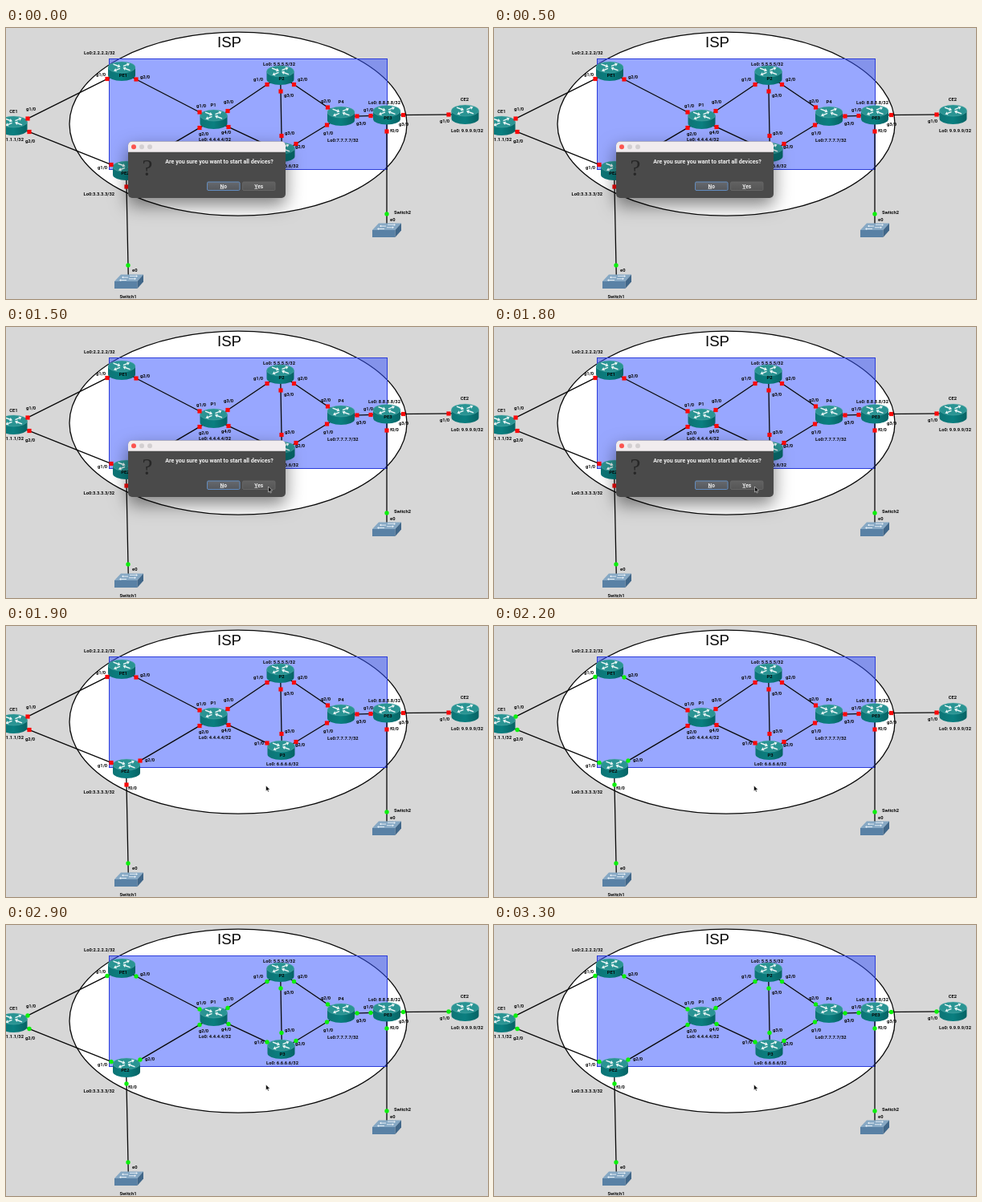
An HTML page with a canvas for the animation above (3400 ms loop, 600x338 px).

```html
<!DOCTYPE html>
<html lang="en">
<head>
<meta charset="utf-8">
<title>Starting a network topology</title>
<style>
html, body { margin: 0; width: 100%; height: 100%; overflow: hidden; background: #d7d7d7; }
canvas { display: block; width: 600px; height: 338px; }
</style>
</head>
<body>
<canvas id="stage"></canvas>
<script>
const W = 600, H = 338, LOOP = 3400, STEP = 100;
const DIALOG_END = 1900, BOOT_START = 2000, BOOT_GAP = 100;
const canvas = document.getElementById('stage');
const ctx = canvas.getContext('2d');
const scale = window.devicePixelRatio || 1;
canvas.width = W * scale;
canvas.height = H * scale;

const SANS = 'Roboto, Inter, sans-serif';
const INK = '#080808', LABEL = 5.8;

// centre and label position, in boot order
const routers = {
  CE1: { x: 9.5, y: 122, lx: 9.5, ly: 105.5 },
  PE1: { x: 144, y: 54, lx: 146, ly: 61 },
  PE2: { x: 150, y: 178, lx: 148.5, ly: 182.5 },
  P1: { x: 258.5, y: 114, lx: 258, ly: 98 },
  P2: { x: 341.5, y: 59, lx: 343, ly: 65 },
  P3: { x: 342.5, y: 155, lx: 344, ly: 163 },
  P4: { x: 417, y: 110, lx: 417, ly: 94 },
  PE3: { x: 474, y: 108.5, lx: 475.5, ly: 114 },
  CE2: { x: 571.5, y: 108, lx: 571, ly: 91 }
};
Object.values(routers).forEach((r, i) => { r.on = BOOT_START + i * BOOT_GAP; });
const switches = {
  Switch1: { x: 153, y: 316, lx: 152, ly: 336.5, on: 0 },
  Switch2: { x: 474, y: 252, lx: 493.5, ly: 232, on: 0 }
};
const nodes = { ...routers, ...switches };

// ends, with the port dot at each end
const links = [
  ['CE1', 27, 113, 'PE1', 126, 63.5],
  ['CE1', 29, 129.5, 'PE2', 131, 170.5],
  ['PE1', 162, 64, 'P1', 241, 105],
  ['PE2', 167, 168, 'P1', 241, 124.5],
  ['P1', 276, 103.5, 'P2', 325, 70.5],
  ['P1', 277, 123.5, 'P3', 325, 146],
  ['P2', 342, 79, 'P3', 343, 134.5],
  ['P2', 358.5, 70.5, 'P4', 400.5, 99],
  ['P3', 361, 144.5, 'P4', 399.5, 121],
  ['P4', 437, 110, 'PE3', 454, 109.5],
  ['PE3', 494.5, 108.5, 'CE2', 551, 108],
  ['PE3', 474, 129, 'Switch2', 474, 232],
  ['PE2', 150, 198, 'Switch1', 152, 296]
];

// port labels: left edge and baseline
const ports = {
  'g1/0': [112, 60, 237, 99, 308, 66, 309, 148, 395, 133, 445, 104, 540, 117.5, 25, 103, 114, 176],
  'g2/0': [167, 63, 240, 133.5, 363, 66, 360, 150, 392, 93, 24, 143, 173, 169],
  'g3/0': [271, 94, 346, 86, 347, 132.5, 436, 121, 489, 121.5],
  'g4/0': [268, 131.5],
  'f0/0': [478, 130, 152, 204],
  'e0': [157, 304, 478, 241]
};
const loopbacks = [
  ['Lo0:2.2.2.2/32', 97, 33], ['Lo0:3.3.3.3/32', 96.5, 209],
  ['Lo0: 4.4.4.4/32', 240, 141], ['Lo0: 5.5.5.5/32', 320, 47],
  ['Lo0: 6.6.6.6/32', 324, 174], ['Lo0:7.7.7.7/32', 400, 142],
  ['Lo0: 8.8.8.8/32', 451, 95], ['Lo0: 9.9.9.9/32', 554, 129.5]
];

// time, x, y of the pointer tip
const pointer = [[800, 282, 130], [900, 287, 185], [1000, 289, 198], [1400, 326.5, 199], [1600, 326.5, 199], [1900, 323.5, 199]];

function text(str, x, y, size, color = INK, align = 'left', weight = 700, family = SANS) {
  ctx.font = `${weight} ${size}px ${family}`;
  ctx.textAlign = align;
  ctx.fillStyle = color;
  ctx.fillText(str, x, y);
}

function path(points, fill) {
  ctx.beginPath();
  points.forEach(([x, y]) => ctx.lineTo(x, y));
  ctx.closePath();
  ctx.fillStyle = fill;
  ctx.fill();
}

function disc(x, y, r, fill) {
  ctx.beginPath();
  ctx.arc(x, y, r, 0, Math.PI * 2);
  ctx.fillStyle = fill;
  ctx.fill();
}

function arrow(x1, y1, x2, y2, width, color) {
  const a = Math.atan2(y2 - y1, x2 - x1), h = width * 2.4;
  const dx = Math.cos(a), dy = Math.sin(a);
  const bx = x2 - dx * h, by = y2 - dy * h;
  ctx.strokeStyle = color;
  ctx.lineWidth = width;
  ctx.beginPath();
  ctx.moveTo(x1, y1);
  ctx.lineTo(bx, by);
  ctx.stroke();
  path([[x2, y2], [bx - dy * h * 0.7, by + dx * h * 0.7], [bx + dy * h * 0.7, by - dx * h * 0.7]], color);
}

function drawRouter({ x, y }) {
  ctx.save();
  ctx.translate(x, y);
  const body = ctx.createLinearGradient(-17, 0, 17, 0);
  body.addColorStop(0, '#0d7475');
  body.addColorStop(0.5, '#0a7f80');
  body.addColorStop(1, '#066364');
  ctx.beginPath();
  ctx.ellipse(0, 5, 17, 7, 0, 0, Math.PI);
  ctx.lineTo(-17, -5);
  ctx.lineTo(17, -5);
  ctx.closePath();
  ctx.fillStyle = body;
  ctx.fill();
  ctx.beginPath();
  ctx.ellipse(0, -5, 17, 7, 0, 0, Math.PI * 2);
  ctx.fillStyle = '#2a9493';
  ctx.fill();
  ctx.strokeStyle = '#62b0b0';
  ctx.lineWidth = 0.4;
  ctx.stroke();
  const white = '#eef8f8';
  arrow(-10.5, -8.8, -1.5, -5.6, 1.4, white);
  arrow(10.5, -1.2, 1.5, -4.4, 1.4, white);
  arrow(2, -6.4, 10, -9.6, 1.4, white);
  arrow(-2, -3.6, -10, -0.4, 1.4, white);
  ctx.restore();
}

function drawSwitch({ x, y }) {
  ctx.save();
  ctx.translate(x, y);
  path([[-10, -8.5], [18, -8.5], [10.5, 0], [-18, 0]], '#86a8c4');
  path([[-18, 0], [10.5, 0], [10.5, 9], [-18, 9]], '#5981a5');
  path([[10.5, 0], [18, -8.5], [18, 0.5], [10.5, 9]], '#416789');
  const white = '#edf4fa';
  arrow(1, -6.6, 11, -6.6, 0.9, white);
  arrow(-1, -4.9, -9, -4.9, 0.9, white);
  arrow(0, -3.2, 9, -3.2, 0.9, white);
  arrow(-3, -1.5, -12, -1.5, 0.9, white);
  ctx.restore();
}

function drawPort(x, y, up) {
  if (up) return disc(x, y, 2.7, '#0cf00c');
  ctx.fillStyle = '#fa0a0a';
  ctx.fillRect(x - 2.6, y - 2.6, 5.2, 5.2);
}

// runs through both ports and ends beneath the icons
function traceLink([, ax, ay, , bx, by]) {
  const len = Math.hypot(bx - ax, by - ay), k = 12 / len;
  const dx = (bx - ax) * k, dy = (by - ay) * k;
  ctx.moveTo(ax - dx, ay - dy);
  ctx.lineTo(bx + dx, by + dy);
}

function drawNetwork(t) {
  ctx.fillStyle = '#d7d7d7';
  ctx.fillRect(0, 0, W, H);

  ctx.beginPath();
  ctx.ellipse(289, 119.7, 210, 114.5, 0, 0, Math.PI * 2);
  ctx.fillStyle = '#fff';
  ctx.fill();
  ctx.strokeStyle = INK;
  ctx.lineWidth = 1.3;
  ctx.stroke();

  ctx.fillStyle = 'rgba(50, 80, 255, 0.5)';
  ctx.fillRect(128.5, 38.5, 346, 138);
  ctx.strokeStyle = '#2c3cd8';
  ctx.lineWidth = 1;
  ctx.strokeRect(128.5, 38.5, 346, 138);
  text('ISP', 263, 24, 18.6, INK, 'left', 400, '"Liberation Sans", Arial, sans-serif');

  ctx.strokeStyle = INK;
  ctx.lineWidth = 1.3;
  ctx.beginPath();
  links.forEach(traceLink);
  ctx.stroke();

  Object.values(routers).forEach(drawRouter);
  Object.values(switches).forEach(drawSwitch);
  for (const [a, ax, ay, b, bx, by] of links) {
    drawPort(ax, ay, t >= nodes[a].on);
    drawPort(bx, by, t >= nodes[b].on);
  }

  for (const [name, n] of Object.entries(nodes)) text(name, n.lx, n.ly, LABEL, INK, 'center');
  for (const [name, at] of Object.entries(ports)) {
    for (let i = 0; i < at.length; i += 2) text(name, at[i], at[i + 1], LABEL);
  }
  for (const [name, x, y] of loopbacks) text(name, x, y, LABEL);
  text('Lo0: 1.1.1.1/32', 22, 141, LABEL, INK, 'right');
}

function button(label, x, y, w, h, edge, top, bottom) {
  const g = ctx.createLinearGradient(0, y, 0, y + h);
  g.addColorStop(0, top);
  g.addColorStop(1, bottom);
  ctx.beginPath();
  ctx.roundRect(x, y, w, h, 1.5);
  ctx.fillStyle = g;
  ctx.fill();
  ctx.strokeStyle = edge;
  ctx.lineWidth = 0.9;
  ctx.stroke();
  text(label, x + w / 2, y + 7.5, 6.6, '#ececec', 'center');
  const full = ctx.measureText(label).width, first = ctx.measureText(label[0]).width;
  ctx.fillRect(x + w / 2 - full / 2, y + 8.4, first, 0.6);
}

function drawDialog() {
  const x = 152, y = 141.5, w = 196, h = 70.5;
  ctx.save();
  ctx.shadowColor = 'rgba(0, 0, 0, 0.5)';
  ctx.shadowBlur = 22 * scale;
  ctx.shadowOffsetY = 9 * scale;
  ctx.beginPath();
  ctx.roundRect(x, y, w, h, 5);
  ctx.fillStyle = '#4a4a4a';
  ctx.fill();
  ctx.restore();
  ctx.beginPath();
  ctx.roundRect(x, y, w, 13.3, [5, 5, 0, 0]);
  ctx.fillStyle = '#f1ecee';
  ctx.fill();
  disc(159, 148.2, 3, '#fb5450');
  disc(169, 148.2, 3, '#d3cfd1');
  disc(179, 148.2, 3, '#d3cfd1');
  text('?', 176, 184, 29, '#272727', 'center', 400, '"Liberation Serif", "Times New Roman", serif');
  text('Are you sure you want to start all devices?', 265.5, 169.3, 7.1, '#f0f0f0', 'center');
  button('No', 250.5, 192, 40.5, 10.5, '#6694cb', '#66696e', '#55585d');
  button('Yes', 294.5, 192, 40.5, 10.5, '#686868', '#626262', '#555');
}

function pointerAt(t) {
  const last = pointer[pointer.length - 1];
  const i = pointer.findIndex(p => p[0] > t);
  if (i < 0) return [last[1], last[2]];
  const [t0, x0, y0] = pointer[i - 1], [t1, x1, y1] = pointer[i];
  const k = (t - t0) / (t1 - t0);
  return [x0 + (x1 - x0) * k, y0 + (y1 - y0) * k];
}

function drawPointer(t) {
  ctx.save();
  ctx.translate(...pointerAt(t));
  path([[0, 0], [0, 7], [1.6, 5.6], [2.7, 8], [3.8, 7.5], [2.8, 5.2], [5, 5]], '#0a0a0a');
  ctx.strokeStyle = '#fff';
  ctx.lineWidth = 0.5;
  ctx.stroke();
  ctx.restore();
}

function frame(now) {
  const t = Math.floor((now % LOOP) / STEP) * STEP;
  ctx.setTransform(scale, 0, 0, scale, 0, 0);
  drawNetwork(t);
  if (t < DIALOG_END) drawDialog();
  if (t >= pointer[0][0]) drawPointer(t);
  requestAnimationFrame(frame);
}
requestAnimationFrame(frame);
</script>
</body>
</html>
```
